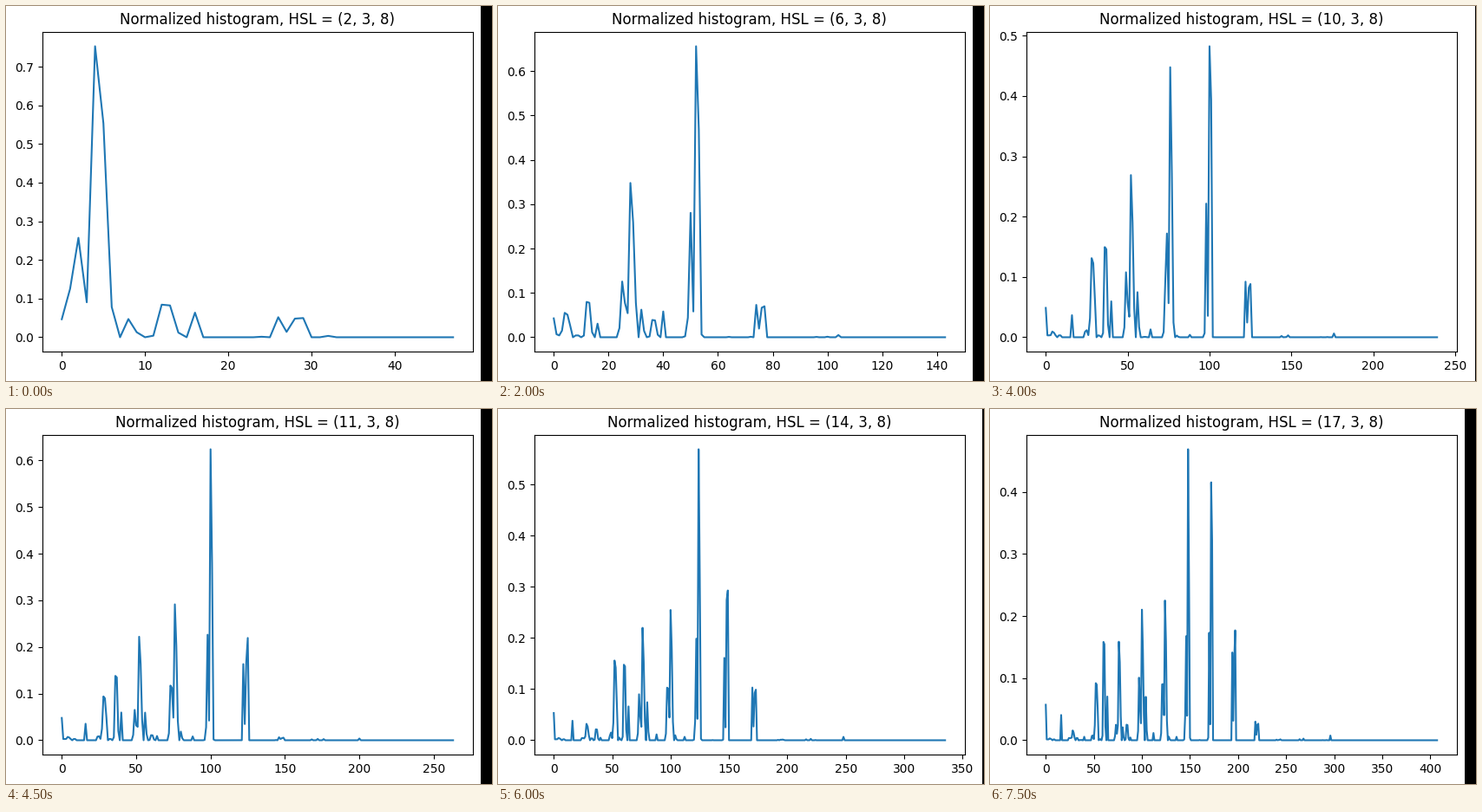
Recreate the animation shown at these times as a matplotlib script. Size 560 px wide and 433 px high, loop 8 s.

```python
from math import erf, sqrt

import numpy as np
import matplotlib.pyplot as plt
from matplotlib.animation import FuncAnimation
from matplotlib.patches import Rectangle
from matplotlib.transforms import IdentityTransform

W, H, DPI = 560, 433, 100
LEFT, BOTTOM, AX_W, AX_H = 41.72, 33.72, 496, 369.6
SAT, LIGHT = 3, 8
FIRST, LAST = 2, 17

clusters = []


def cluster(hue, spread, sat, weights):
    """Pixels around one hue, weighted by lightness bin."""
    clusters.append((hue, spread, sat, weights))


def share(edges, hue, spread):
    """Part of a bell curve that falls between neighbouring edges."""
    return np.diff([0.5 * erf((e - hue) / (spread * sqrt(2))) for e in edges])


# greys, which all have hue zero
cluster(.004, .001, 0, {0: 25.5})
cluster(.004, .001, 2, {0: 18.4})

# faint scatter at low hues
cluster(.09, .04, 0, dict.fromkeys(range(7), 3))
cluster(.09, .04, 1, {0: 3, 1: 3})
cluster(.09, .02, 2, {0: 3})

# warm tones
cluster(.17, .02, 0, {0: 4, 1: 4, 3: 14, 4: 28, 5: 38, 6: 36})
cluster(.16, .015, 1, {3: 4, 4: 84, 5: 82, 6: 12})
cluster(.1715, .002, 2, {0: 32})

# greens
cluster(.285, .08, 0, {4: 345, 5: 240})
cluster(.285, .04, 0, {0: 14, 1: 95, 2: 45, 6: 39})
cluster(.255, .025, 1, {0: 44, 1: 10})
cluster(.27, .04, 2, {0: 10})

# the main teal range
cluster(.35, .09, 0, {3: 75})
cluster(.37, .03, 0, {1: 23})
cluster(.415, .055, 0, {2: 215})
cluster(.413, .034, 0, {4: 370})
cluster(.432, .045, 0, {5: 285})

# blues and a thin violet tail
cluster(.517, .016, 0, {2: 45, 3: 12, 4: 50, 5: 35})
cluster(.66, .03, 0, {0: 1.3, 4: 2})
cluster(.73, .01, 1, {0: 3.5})


def histogram(hues):
    edges = np.linspace(0, 1, hues + 1)
    bins = np.zeros((hues, SAT, LIGHT))
    for hue, spread, sat, weights in clusters:
        part = share(edges, hue, spread)
        for light, weight in weights.items():
            bins[:, sat, light] += weight * part
    return bins.ravel() / np.linalg.norm(bins)


def page_width():
    """The page grows when the last tick label sticks out of the axes."""
    ticks = ax.get_xticks()
    last = ticks[ticks <= ax.get_xlim()[1]].max()
    x = ax.transData.transform((last, 0))[0]
    return max(int(LEFT + AX_W + 10), int(x + 23.5))


fig = plt.figure(figsize=(W / DPI, H / DPI), dpi=DPI, facecolor="white")
ax = fig.add_axes([LEFT / W, BOTTOM / H, AX_W / W, AX_H / H])
line, = ax.plot([], [], color="#1f77b4", lw=1.5)
title = ax.set_title("")
bar = fig.add_artist(Rectangle((W, 0), W, H, color="black", lw=0,
                               antialiased=False,
                               transform=IdentityTransform()))


def update(i):
    hues = FIRST + i
    values = histogram(hues)
    line.set_data(np.arange(values.size), values)
    ax.relim()
    ax.autoscale_view()
    title.set_text(f"Normalized histogram, HSL = ({hues}, {SAT}, {LIGHT})")
    bar.set_x(page_width())
    return line, title, bar


anim = FuncAnimation(fig, update, frames=LAST - FIRST + 1, interval=500,
                     repeat=True, repeat_delay=0)
plt.show()
```
